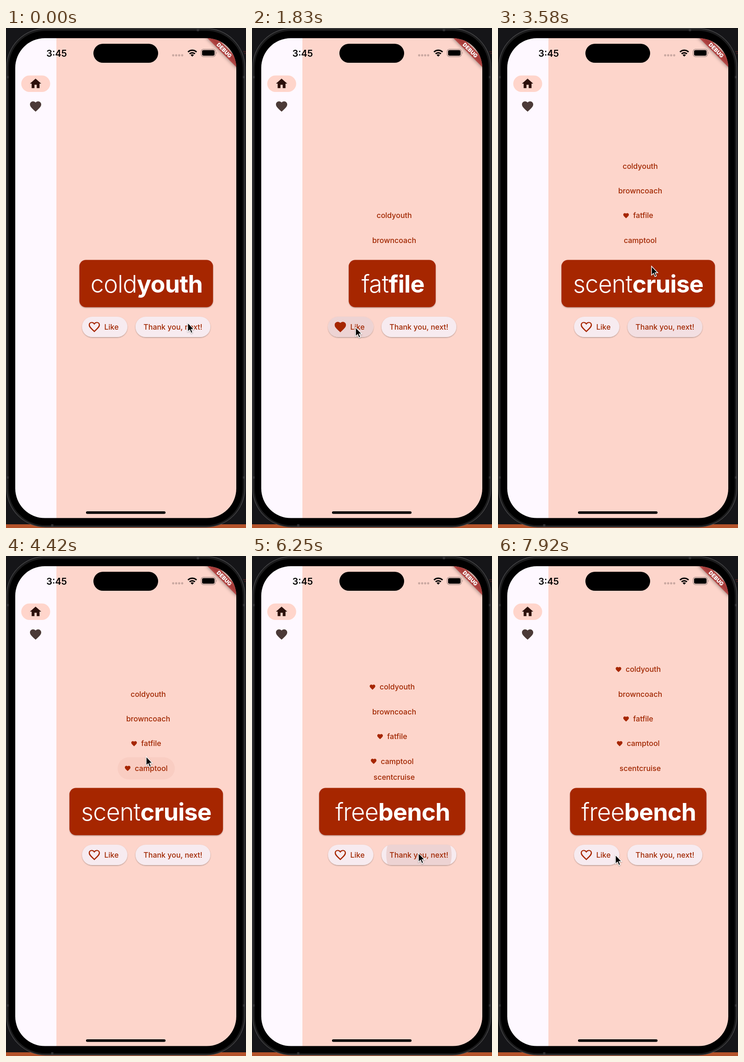
Animation, 519 px wide and 1079 px high, one loop 8 s. Source, as an HTML page:

```html
<!DOCTYPE html>
<html lang="en">
<head>
<meta charset="utf-8">
<title>Word pairs</title>
<style>
  html, body { margin: 0; width: 100%; height: 100%; overflow: hidden; background: #151518; }
  svg { font-family: Inter, Roboto, sans-serif; font-optical-sizing: none; }
  #stage { display: block; width: 100%; height: 100%; }
  .label { font-size: 16px; font-weight: 500; fill: #a02600; }
  .word { font-size: 52px; letter-spacing: -.8px; fill: #fff; }
  .light { font-weight: 300; text-anchor: end; }
  .bold { font-weight: 700; }
</style>
</head>
<body>
<svg id="stage" viewBox="0 0 519 1079" preserveAspectRatio="none">
  <defs>
    <path id="heart" d="M12 21.35l-1.45-1.32C5.4 15.36 2 12.28 2 8.5 2 5.42 4.42 3 7.5 3c1.74 0 3.41.81 4.5 2.09C13.09 3.81 14.76 3 16.5 3 19.58 3 22 5.42 22 8.5c0 3.78-3.4 6.86-8.55 11.54z"/>
    <clipPath id="heartClip"><use href="#heart"/></clipPath>
    <clipPath id="screenClip"><rect x="20" y="22" width="478" height="1035.5" rx="64"/></clipPath>
    <clipPath id="likeClip"><rect x="164.500" y="623" width="98" height="44" rx="22"/></clipPath>
    <clipPath id="nextClip"><rect x="280" y="623" width="162" height="44" rx="22"/></clipPath>
    <filter id="lift" x="-10%" y="-20%" width="120%" height="150%">
      <feDropShadow dx="0" dy="1.2" stdDeviation="1" flood-opacity=".32"/>
    </filter>
    <filter id="blur" x="-50%" y="-150%" width="200%" height="400%"><feGaussianBlur stdDeviation="4.5"/></filter>
  </defs>

  <!-- device -->
  <rect width="519" height="1079" fill="#151518"/>
  <rect y="1071" width="519" height="8" fill="#b4532b"/>
  <path d="M513 51h6M515 55h4" stroke="#6b2b28"/>
  <rect x="1.500" y="1" width="515" height="1076" rx="84" fill="#1b1b1c" stroke="#49494b" stroke-width="1.3"/>
  <rect x="6" y="6" width="506" height="1067" rx="79"/>
  <path d="M415 2v5M100 1071v5M2 106h4M2 970h4M512 106h4M512 970h4" stroke="#303032" stroke-width="5"/>

  <!-- screen -->
  <g clip-path="url(#screenClip)">
    <rect x="20" y="22" width="89" height="1036" fill="#fef8ff"/>
    <rect x="109" y="22" width="389" height="1036" fill="#fdd5cb"/>
    <g transform="translate(498 22) rotate(45)">
      <rect x="-49" y="29.500" width="98" height="14.500" opacity=".5" filter="url(#blur)"/>
      <rect x="-49" y="29.500" width="98" height="14.500" fill="#b71c1c" fill-opacity=".627"/>
      <text y="41" text-anchor="middle" font-size="11.500" font-weight="900" fill="#fff">DEBUG</text>
    </g>
  </g>

  <!-- status bar -->
  <text x="109.500" y="61.500" text-anchor="middle" font-size="20" font-weight="600">3:45</text>
  <rect x="189" y="34" width="140" height="41" rx="20.500"/>
  <g fill="#c9a8a1">
    <circle cx="361.500" cy="59" r="2.400"/><circle cx="368" cy="59" r="2.400"/>
    <circle cx="374.500" cy="59" r="2.400"/><circle cx="381" cy="59" r="2.400"/>
  </g>
  <g fill="none" stroke="#000" stroke-width="3">
    <path d="M393.500 51.800a13.200 13.200 0 0 1 18.600 0M397 55.800a8.300 8.300 0 0 1 11.600 0"/>
  </g>
  <path d="M399.300 58.200a5 5 0 0 1 7 0l-3.500 3.500z"/>
  <rect x="422" y="45.800" width="31" height="16" rx="5" fill="none" stroke="#9c8580" stroke-width="1.200"/>
  <rect x="424" y="47.800" width="27" height="12" rx="3.300"/>
  <path d="M454.700 51.300q2 2.500 0 5z" fill="#9c8580"/>
  <rect x="173" y="1043" width="172" height="5.500" rx="2.750"/>

  <!-- navigation -->
  <rect x="33" y="102.500" width="62.500" height="35.500" rx="17.750" fill="#ffd5cb"/>
  <path transform="translate(49.400 105.500) scale(1.216)" fill="#2b100b" d="M10 20v-6h4v6h5v-8h3L12 3 2 12h3v8z"/>
  <use href="#heart" transform="translate(49.400 154.600) scale(1.216)" fill="#4b3a37"/>

  <g id="list"></g>

  <!-- word card -->
  <rect id="card" y="500.500" height="102" rx="14" fill="#a62600" filter="url(#lift)"/>
  <svg id="wordBox" y="501" height="101">
    <text id="light" class="word light" y="69.500"></text>
    <text id="bold" class="word bold" y="69.500"></text>
  </svg>

  <!-- buttons -->
  <g fill="#f7ebf0" filter="url(#lift)">
    <rect x="164.500" y="623" width="98" height="44" rx="22"/>
    <rect x="280" y="623" width="162" height="44" rx="22"/>
  </g>
  <g fill="#a62600">
    <g clip-path="url(#likeClip)"><circle id="likeInk" cy="645"/></g>
    <g clip-path="url(#nextClip)"><circle id="nextInk" cy="645"/></g>
  </g>
  <g transform="translate(176.400 630.500) scale(1.216)">
    <use id="likeFill" href="#heart" fill="#a62600"/>
    <g clip-path="url(#heartClip)"><use href="#heart" fill="none" stroke="#a62600" stroke-width="4"/></g>
  </g>
  <text class="label" x="212.500" y="650.500">Like</text>
  <text class="label" x="361" y="650.500" text-anchor="middle">Thank you, next!</text>

  <path id="pointer" d="M0 0V19.500L4.400 15.500 7.400 22.500 10.600 21.100 7.700 14.300H13.500Z"
    stroke="#fff" stroke-width="1.400" style="filter:drop-shadow(0 1px 1px rgba(0,0,0,.35))"/>
</svg>
<script>
const LOOP = 8000, CENTER = 303.2, ROW = 53.35, PAD = 23;
const ROW_MS = 300, SIZE_MS = 200;

// width: card width, split: where the bold half begins, shown / liked: times in ms
const words = [
  { halves: ['cold', 'youth'], width: 289, split: 283, shown: -1000, liked: 5400 },
  { halves: ['brown', 'coach'], width: 347, split: 302.5, shown: 330 },
  { halves: ['fat', 'file'], width: 188, split: 295.5, shown: 930, liked: 1735 },
  { halves: ['camp', 'tool'], width: 273, split: 319, shown: 2640, liked: 4050 },
  { halves: ['scent', 'cruise'], width: 332, split: 290.5, shown: 3240 },
  { halves: ['free', 'bench'], width: 295, split: 273, shown: 6165 }
];

// time, x, y of the pointer tip
const route = [
  [0, 393, 636], [250, 391, 643], [1050, 390, 645], [1620, 224, 646], [1950, 224, 646],
  [2480, 390, 648], [3260, 390, 648], [3580, 332, 514], [3900, 300, 456], [4250, 300, 456],
  [4950, 321, 301], [5550, 321, 301], [6050, 360, 641], [6500, 360, 641], [7850, 254, 645], [8000, 254, 645]
];

const $ = id => document.getElementById(id);
const clamp = v => Math.max(0, Math.min(1, v));
const mix = (a, b, p) => a + (b - a) * p;
const smooth = p => p * p * (3 - 2 * p);
const set = (node, attrs) => { for (const k in attrs) node.setAttribute(k, attrs[k]); };

$('list').innerHTML = words.slice(0, -1).map(w => `
  <svg x="110" width="388">
    <g>
      <rect class="ink" y="-24" height="48" rx="24" fill="#a62600"/>
      <use href="#heart" fill="#a62600"/>
      <text class="label" y="5.5">${w.halves.join('')}</text>
    </g>
  </svg>`).join('');

const rows = [...$('list').children].map(svg => ({
  svg,
  group: svg.querySelector('g'),
  ink: svg.querySelector('.ink'),
  heart: svg.querySelector('use'),
  text: svg.querySelector('text')
}));

const inkFade = age => age < -80 ? 0 : clamp((age + 80) / 60) * clamp((450 - age) / 225) * .12;

function drawInk(circle, center, halfWidth, t, clicks) {
  const click = clicks.find(c => t > c - 80 && t < c + 450);
  const age = click === undefined ? 1000 : t - click;
  const reach = Math.hypot(halfWidth, 22);
  set(circle, {
    cx: center,
    r: mix(reach * .3, reach + 6, clamp((age + 90) / 250)),
    opacity: inkFade(age)
  });
}

function drawRows(t) {
  let bottom = 485;
  for (let i = rows.length - 1; i >= 0; i--) {
    const { svg, group, ink, heart, text } = rows[i];
    const word = words[i];
    const height = ROW * clamp((t - words[i + 1].shown) / ROW_MS);
    svg.style.display = height ? '' : 'none';
    if (!height) continue;
    bottom -= height;
    set(svg, { y: bottom, height });
    set(group, { transform: `translate(-110 ${height / 2})` });

    const liked = t >= word.liked;
    const length = text.getComputedTextLength();
    const left = (liked ? 314 : 307.5) - length / 2;
    const half = CENTER - left + (liked ? 37 : 20);
    set(text, { x: left });
    set(heart, {
      transform: `translate(${left - 22.6} -7.3) scale(.608)`,
      opacity: liked ? 1 : 0
    });
    set(ink, { x: CENTER - half, width: half * 2, opacity: word.liked > words[i + 1].shown ? inkFade(t - word.liked) : 0 });
  }
}

function drawCard(t) {
  const index = words.findLastIndex(w => t >= w.shown);
  const word = words[index], before = words[index - 1] || word;
  const width = mix(before.width, word.width, clamp((t - word.shown) / SIZE_MS));
  const inner = width - 2 * PAD + 4, left = CENTER - inner / 2;
  set($('card'), { x: CENTER - width / 2, width });
  set($('wordBox'), { x: left, width: inner });
  ['light', 'bold'].forEach((id, k) => {
    $(id).textContent = word.halves[k];
    set($(id), { x: word.split - left });
  });
  set($('likeFill'), { opacity: t >= word.liked ? 1 : 0 });
}

function drawPointer(t) {
  const next = Math.max(1, route.findIndex(k => k[0] > t));
  const [t0, x0, y0] = route[next - 1], [t1, x1, y1] = route[next];
  const p = smooth((t - t0) / (t1 - t0));
  set($('pointer'), { transform: `translate(${mix(x0, x1, p)} ${mix(y0, y1, p)})` });
}

const nextClicks = words.slice(1).map(w => w.shown);
const start = performance.now();

function frame(now) {
  const t = Math.max(0, now - start) % LOOP;
  drawRows(t);
  drawCard(t);
  drawInk($('likeInk'), 213.5, 49, t, [words[2].liked]);
  drawInk($('nextInk'), 361, 81, t, nextClicks);
  drawPointer(t);
  requestAnimationFrame(frame);
}
frame(start);
</script>
</body>
</html>
```
